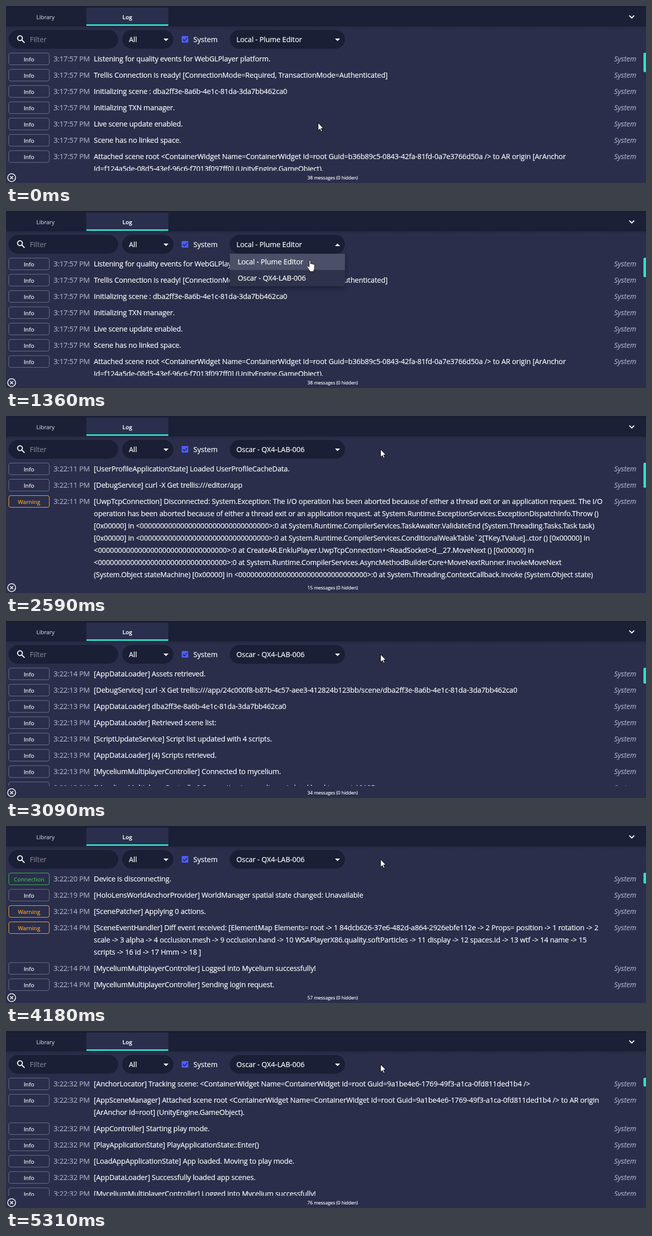
Recreate the animation shown at these times as an HTML page. Size 1250 by 348 pixels, loop 6510 ms.

```html
<!DOCTYPE html>
<html lang="en">
<head>
<meta charset="utf-8">
<title>Device log</title>
<style>
html, body { margin: 0; width: 100%; height: 100%; overflow: hidden; background: #2a2e4b; }
#stage { position: relative; width: 1250px; height: 348px; overflow: hidden; font: 14px "Open Sans", sans-serif; color: #fff; -webkit-text-stroke: .2px; }
svg { position: absolute; left: 0; top: 0; overflow: visible; }
text { fill: currentColor; stroke: currentColor; stroke-width: .2px; }

/* log list */
.log { position: absolute; left: 0; top: 92px; width: 1250px; height: 232px; overflow: hidden; }
.row { display: grid; grid-template-columns: 80px 70.6px 1fr auto; column-gap: 8px; padding: 0 19px 8px 5px; line-height: 24px; letter-spacing: -.01em; white-space: pre; }
.bare .row { padding-right: 12px; }
.row[hidden], .log[hidden] { display: none; }
.badge { box-sizing: border-box; height: 24px; padding-top: 1px; border: 1px solid; border-radius: 4px; font-size: 11px; line-height: 22px; letter-spacing: .1px; text-align: center; }
.i { border-color: #6c7088; }
.w { color: #ffa726; }
.c { color: #3fb950; }
.time { color: #a9adc0; }
.source { color: #a9adc0; font-style: italic; letter-spacing: 0; }
#thumb { position: absolute; left: 1245px; top: 92px; width: 5px; border-radius: 2px 0 0 2px; background: #2fdfcc; }
#count { position: absolute; left: 538px; top: 331px; width: 200px; font-size: 9px; line-height: 13px; text-align: center; }
#label { position: absolute; left: 450px; top: 54px; line-height: 24px; letter-spacing: -.005em; }

/* device menu and pointer */
#menu, #menu *, #flip, #cursor, #cursor * { animation: 6510ms linear infinite; }
#menu { position: absolute; left: 437px; top: 84px; width: 225px; height: 64px; overflow: hidden; border-radius: 0 0 4px 4px; background: #2e334b; box-shadow: 0 4px 8px rgba(12, 15, 32, .45); transform-origin: 50% 0; animation-name: menu; }
.item { position: relative; height: 32px; padding-left: 15.5px; overflow: hidden; line-height: 32px; letter-spacing: -.005em; }
#menu .item { animation-timing-function: step-end; }
#one { animation-name: one; }
#two { animation-name: two; }
#ripple { position: absolute; left: 85px; top: -59px; width: 150px; height: 150px; border-radius: 50%; background: rgba(255, 255, 255, .22); animation-name: ripple; }
#flip { transform-origin: 647.5px 66.5px; animation-name: flip; animation-timing-function: step-end; }
#cursor { position: absolute; left: 0; top: 0; animation-name: move; }
#cursor path { fill: #fff; stroke: #000; animation-timing-function: step-end; }
#arrow { animation-name: arrow; }
#hand { transform: translate(-6.5px, -.5px); animation-name: hand; }

@keyframes menu {
  0%, 15.67% { opacity: 0; transform: scale(.9); }
  17.5%, 25.96% { opacity: 1; transform: none; }
  26.42% { opacity: .55; transform: none; }
  27.1%, 100% { opacity: 0; transform: none; }
}
@keyframes one { 0% { background: #4b5068; } 22.1%, 100% { background: none; } }
@keyframes two { 0% { background: none; } 22.1%, 100% { background: #4b5068; } }
@keyframes ripple {
  0%, 24.58% { transform: scale(0); }
  26.42% { transform: scale(1); }
  27.1%, 100% { transform: scale(1.35); }
}
@keyframes flip { 0% { transform: none; } 15.67% { transform: scaleY(-1); } 25.96%, 100% { transform: none; } }
@keyframes move {
  0%, .3% { transform: translate(609px, 229px); }
  2%, 10.4% { transform: translate(609px, 226px); animation-timing-function: ease-in-out; }
  15.2%, 17.2% { transform: translate(597px, 70px); animation-timing-function: ease-in-out; }
  20.43%, 20.9% { transform: translate(593.5px, 97px); animation-timing-function: ease-in-out; }
  23.5%, 27.4% { transform: translate(597.5px, 129px); animation-timing-function: ease-in-out; }
  36%, 100% { transform: translate(731px, 65px); }
}
@keyframes arrow { 0% { visibility: visible; } 14% { visibility: hidden; } 27.6%, 100% { visibility: visible; } }
@keyframes hand { 0% { visibility: hidden; } 14% { visibility: visible; } 27.6%, 100% { visibility: hidden; } }
</style>
</head>
<body>
<div id="stage">
  <svg width="1250" height="348">
    <defs>
      <linearGradient id="shade" x2="0" y2="1">
        <stop stop-color="#25293f"/><stop offset="1" stop-color="#2a2e4b"/>
      </linearGradient>
    </defs>
    <rect width="1250" height="40" fill="#1c2037"/>
    <rect y="2" width="1250" height="1" fill="#15192b"/>
    <rect y="40" width="1250" height="6" fill="url(#shade)"/>
    <rect x="157" y="3" width="160" height="33" fill="#2a2f4d"/>
    <rect x="157" y="36" width="160" height="3" fill="#2fdfcc"/>
    <g font-size="11" text-anchor="middle">
      <text x="77" y="26" color="#c3c6d2">Library</text>
      <text x="237" y="26" font-weight="600">Log</text>
    </g>
    <g fill="#1a1f35">
      <rect x="5" y="47" width="214" height="37" rx="18.5"/>
      <rect x="227" y="47" width="100" height="37" rx="18.5"/>
      <rect x="437" y="47" width="225" height="37" rx="18.5"/>
    </g>
    <text x="46.5" y="71" color="#7b7f91">Filter</text>
    <text x="240" y="71">All</text>
    <text x="366" y="71">System</text>
    <rect x="343" y="59" width="13" height="13" rx="1.5" fill="#4d5dfa"/>
    <path d="M345.5 65.5l3 3 5.5-5.8" fill="none" stroke="#22264a" stroke-width="1.6"/>
    <g fill="none" stroke="#fff" stroke-width="2">
      <circle cx="27.3" cy="63.3" r="4.7"/>
      <path d="M30.8 66.8l5.4 5.4M1217.5 18.8l4.7 4.7 4.7-4.7"/>
      <circle cx="11" cy="337.5" r="7.7" stroke-width="1.6"/>
      <path d="M8 334.5l6 6m0-6l-6 6" stroke-width="1.7"/>
    </g>
    <path d="M307.5 64h10l-5 5z" fill="#fff"/>
    <path id="flip" d="M642.5 64h10l-5 5z" fill="#fff"/>
  </svg>
  <div id="label"></div>
  <div id="local" class="log"></div>
  <div id="device" class="log"></div>
  <div id="thumb"></div>
  <div id="count"></div>
  <div id="menu">
    <div id="one" class="item">Local - Plume Editor</div>
    <div id="two" class="item"><div id="ripple"></div>Oscar - QX4-LAB-006</div>
  </div>
  <svg id="cursor" width="24" height="26">
    <path id="arrow" d="M.5 .5V16l3.6-3.4L6.6 18l2.3-1-2.4-5.3h4.7z"/>
    <path id="hand" d="M5 1.8C5 .1 7.9 .1 7.9 1.8V7.2c.6-.9 2.6-.7 2.8.6.6-.8 2.4-.5 2.6.8.8-.6 2.3-.1 2.3 1.4v5c0 3-1.4 4.2-1.8 7.5H6.3C5.8 19 2.5 16.5 1 13.2c-.7-1.6 1.2-2.6 2.3-1.3L5 13.6z"/>
  </svg>
</div>

<!-- kind, seconds, message; newest first, | breaks a line -->
<script type="text/plain" id="localRows">
i57 Listening for quality events for WebGLPlayer platform.
i57 Trellis Connection is ready! [ConnectionMode=Required, TransactionMode=Authenticated]
i57 Initializing scene : dba2ff3e-8a6b-4e1c-81da-3da7bb462ca0
i57 Initializing TXN manager.
i57 Live scene update enabled.
i57 Scene has no linked space.
i57 Attached scene root <ContainerWidget Name=ContainerWidget Id=root Guid=b36b89c5-0843-42fa-81fd-0a7e3766d50a /> to AR origin [ArAnchor|Id=f124a5de-08d5-43ef-96c6-f7013f097ff0] (UnityEngine.GameObject).
</script>
<script type="text/plain" id="deviceRows">
i32 [AnchorLocator] Tracking scene: <ContainerWidget Name=ContainerWidget Id=root Guid=9a1be4e6-1769-49f3-a1ca-0fd811ded1b4 />
i32 [AppSceneManager] Attached scene root <ContainerWidget Name=ContainerWidget Id=root Guid=9a1be4e6-1769-49f3-a1ca-0fd811ded1b4 /> to AR origin|[ArAnchor Id=root] (UnityEngine.GameObject).
i32 [AppController] Starting play mode.
i32 [PlayApplicationState] PlayApplicationState::Enter()
i32 [LoadAppApplicationState] App loaded. Moving to play mode.
i32 [AppDataLoader] Successfully loaded app scenes.
i32 [MyceliumMultiplayerController] Logged into Mycelium successfully!
i32 [MyceliumMultiplayerController] Sending login request.
i31 [AppDataLoader] Assets retrieved.
i31 [AppDataLoader] Retrieved scene list:
i31 [ScriptUpdateService] Script list updated with 4 scripts.
i31 [AppDataLoader] (4) Scripts retrieved.
i30 [MyceliumMultiplayerController] Connected to mycelium.
i30 [LoadAppApplicationState] LoadAppApplicationState::Enter()
i29 [UserProfileApplicationState] Loaded UserProfileCacheData.
i29 [DebugService] curl -X Get trellis:///editor/app
i28 [AppController] Unloading app.
i28 [UwpSocketLogger] Thread spinning up
i27 [AppSceneManager] Scene unloaded.
c20 Device is disconnecting.
i19 [HoloLensWorldAnchorProvider] WorldManager spatial state changed: Unavailable
w14 [ScenePatcher] Applying 0 actions.
w14 [SceneEventHandler] Diff event received: [ElementMap Elements= root -> 1 84dcb626-37e6-482d-a864-2926ebfe112e -> 2 Props= position -> 1 rotation -> 2|scale -> 3 alpha -> 4 occlusion.mesh -> 9 occlusion.hand -> 10 WSAPlayerX86.quality.softParticles -> 11 display -> 12 spaces.id -> 13 wtf -> 14 name -> 15|scripts -> 16 id -> 17 Hmm -> 18 ]
i14 [MyceliumMultiplayerController] Logged into Mycelium successfully!
i14 [MyceliumMultiplayerController] Sending login request.
i14 [AnchorLocator] Tracking scene: root
i14 [AppSceneManager] Attached scene root to AR origin.
i14 [AppController] Starting play mode.
i14 [PlayApplicationState] PlayApplicationState::Enter()
i14 [LoadAppApplicationState] App loaded. Moving to play mode.
w14 [AnchorLocator] No primary anchor found.
i14 [AppDataLoader] Successfully loaded app scenes.
i14 [AppSceneManager] Live scene update enabled.
i14 [AppSceneManager] Scene has no linked space.
i14 [AppSceneManager] Initializing TXN manager.
i14 [AppSceneManager] Initializing scene : dba2ff3e-8a6b-4e1c-81da-3da7bb462ca0
i14 [ScriptUpdateService] Listening for script updates.
i14 [AssetUpdateService] Asset list updated.
i14 [AssetUpdateService] Listening for asset updates.
i14 [AppDataLoader] Scene retrieved.
i14 [DebugService] curl -X Get trellis:///editor/assets
i14 [Trellis] Connection is ready!
i14 [AppDataLoader] Assets retrieved.
i13 [DebugService] curl -X Get trellis:///app/24c000f8-b87b-4c57-aee3-412824b123bb/scene/dba2ff3e-8a6b-4e1c-81da-3da7bb462ca0
i13 [AppDataLoader] dba2ff3e-8a6b-4e1c-81da-3da7bb462ca0
i13 [AppDataLoader] Retrieved scene list:
i13 [ScriptUpdateService] Script list updated with 4 scripts.
i13 [AppDataLoader] (4) Scripts retrieved.
i13 [MyceliumMultiplayerController] Connected to mycelium.
i13 [MyceliumMultiplayerController] Connecting to mycelium at cloud.local tcp port 10105
i13 [DebugService] curl -X Get trellis:///app/24c000f8-b87b-4c57-aee3-412824b123bb/scene
i12 [AppDataLoader] Loading scripts.
i12 [AppDataLoader] Loading assets.
i12 [AppDataLoader] Loading scene list.
i12 [LoadAppApplicationState] LoadAppApplicationState::Enter()
i12 [AppController] Loading app 24c000f8-b87b-4c57-aee3-412824b123bb
i12 [UwpTcpConnection] Connected.
i12 [UwpTcpConnection] Connecting to socket.
i12 [DebugService] curl -X Get trellis:///editor/app/24c000f8-b87b-4c57-aee3-412824b123bb
i11 [UserProfileApplicationState] Loading default app.
i11 [UserProfileApplicationState] Retrieved app list.
i11 [UserProfileApplicationState] Loaded UserProfileCacheData.
i11 [DebugService] curl -X Get trellis:///editor/app
w11 [UwpTcpConnection] Disconnected: System.Exception: The I/O operation has been aborted because of either a thread exit or an application request. The I/O|operation has been aborted because of either a thread exit or an application request. at System.Runtime.ExceptionServices.ExceptionDispatchInfo.Throw ()|[0x00000] in <00000000000000000000000000000000>:0 at System.Runtime.CompilerServices.TaskAwaiter.ValidateEnd (System.Threading.Tasks.Task task)|[0x00000] in <00000000000000000000000000000000>:0 at System.Runtime.CompilerServices.ConditionalWeakTable`2[TKey,TValue]..ctor () [0x00000] in|<00000000000000000000000000000000>:0 at CreateAR.EnkluPlayer.UwpTcpConnection+<ReadSocket>d__27.MoveNext () [0x00000] in|<00000000000000000000000000000000>:0 at System.Runtime.CompilerServices.AsyncMethodBuilderCore+MoveNextRunner.InvokeMoveNext|(System.Object stateMachine) [0x00000] in <00000000000000000000000000000000>:0 at System.Threading.ContextCallback.Invoke (System.Object state)
i11 [UserProfileApplicationState] UserProfileApplicationState::Enter()
i11 [LoginApplicationState] Login complete.
i10 [LoginApplicationState] Credentials loaded from disk.
i10 [LoginApplicationState] LoginApplicationState::Enter()
i10 [DeviceResourceUpdateService] Device registered.
i10 [InitializeApplicationState] Services started.
i10 [InitializeApplicationState] Starting services.
i09 [QualityService] Quality settings applied.
i09 [UwpTcpConnection] Connected.
i09 [UwpTcpConnection] Connecting to socket.
i08 [UwpSocketLogger] Thread spinning up
c09 Device is connecting.
</script>
<script>
const LOOP = 6510, SWITCH = 1705, VIEW = 232;
const KINDS = { i: "Info", w: "Warning", c: "Connection" };
// time, messages received so far
const ARRIVALS = [
  [SWITCH, 2], [2220, 4], [2400, 9], [2580, 15], [2620, 17],
  [2690, 20], [2760, 24], [2850, 28], [2920, 32],
  [3085, 34], [3165, 38], [3245, 42], [3320, 46], [3400, 55], [3480, 56], [4175, 57],
  [4710, 60], [4790, 63], [4870, 66], [5070, 69], [5150, 72], [5230, 74], [5305, 76]
];
const el = id => document.getElementById(id);

function add(parent, className, text) {
  const node = document.createElement("div");
  node.className = className;
  node.textContent = text;
  parent.append(node);
  return node;
}

function build(id, minute) {
  return el(id + "Rows").textContent.trim().split("\n").map(line => {
    const row = add(el(id), "row", "");
    add(row, "badge " + line[0], KINDS[line[0]]);
    add(row, "time", `3:${minute}:${line.slice(1, 3)} PM`);
    add(row, "text", line.slice(4).replaceAll("|", "\n"));
    add(row, "source", "System");
    return row;
  });
}

build("local", 17);
const rows = build("device", 22);
const names = { local: el("one").textContent, device: el("two").textContent };
let shown = -1;

function show(count) {
  if (count === shown) return;
  shown = count;
  const local = count === 0;
  el("local").hidden = !local;
  el("device").hidden = local;
  el("label").textContent = local ? names.local : names.device;
  el("count").textContent = `${local ? 38 : count} messages (0 hidden)`;
  rows.forEach((row, i) => row.hidden = rows.length - i > count);
  const content = local ? 1416 : count < 13 ? 32 * count : 588 + 34 * count;
  const scrolls = content > VIEW;
  el("device").classList.toggle("bare", !scrolls);
  el("thumb").style.height = (scrolls ? Math.round(VIEW * VIEW / content) : 0) + "px";
}

let start;
function tick(now) {
  start ??= now;
  const t = (now - start) % LOOP;
  show(ARRIVALS.reduce((n, [at, count]) => t >= at ? count : n, 0));
  requestAnimationFrame(tick);
}
show(0);
requestAnimationFrame(tick);
</script>
</body>
</html>
```
